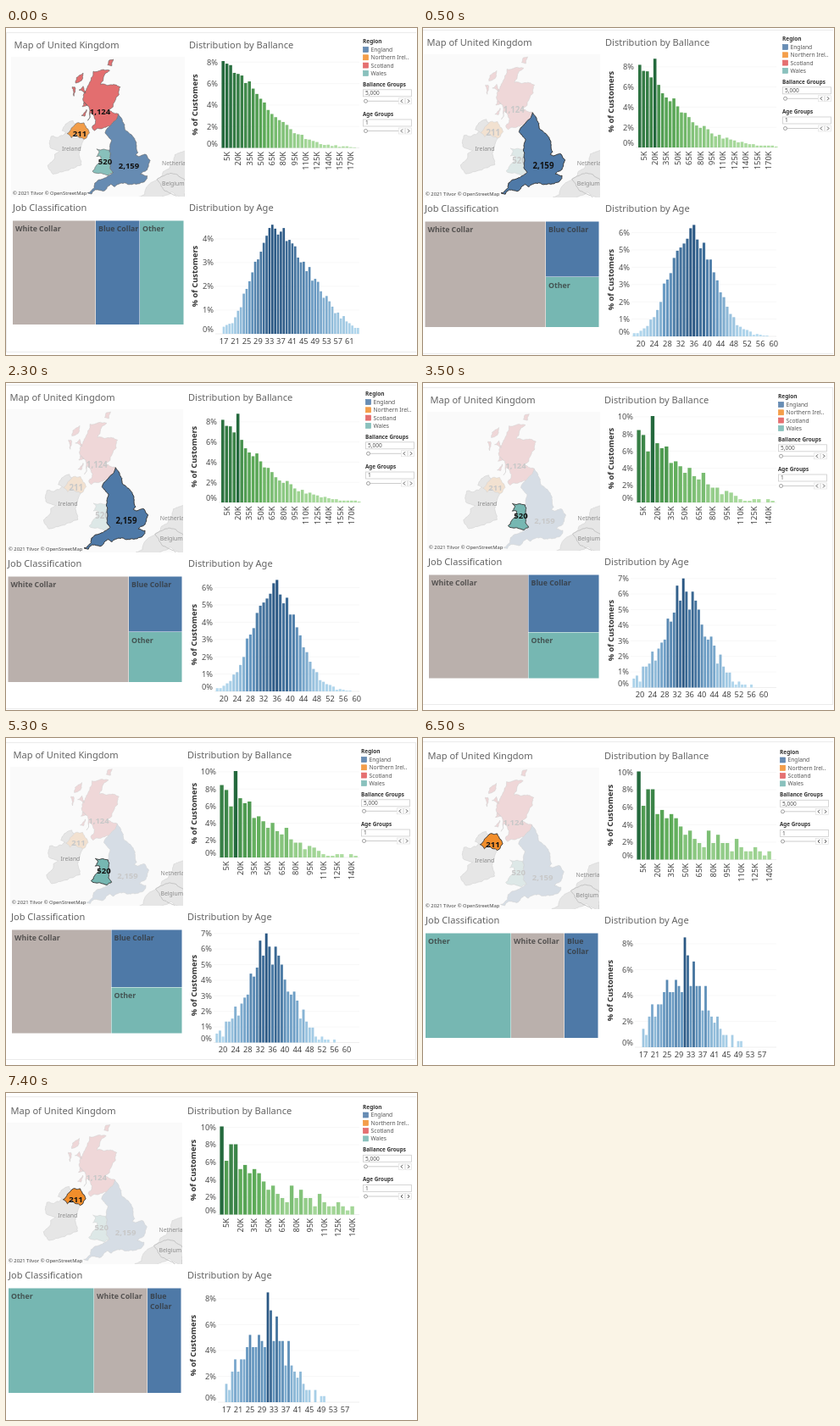
Write an HTML page that moves like this. It is 485 px wide and 386 px high and loops after 8000 ms.

```html
<!DOCTYPE html>
<html lang="en">
<head>
<meta charset="utf-8">
<title>Customer dashboard</title>
<style>
html, body { margin: 0; width: 100%; height: 100%; overflow: hidden; background: #fff; }
svg { display: block; width: 485px; height: 386px; font-family: "Noto Sans", "Open Sans", sans-serif; }
.scene { visibility: hidden; animation: 8s step-end infinite; }
.scene:nth-of-type(1) { animation-name: all; }
.scene:nth-of-type(2) { animation-name: england; }
.scene:nth-of-type(3) { animation-name: wales; }
.scene:nth-of-type(4) { animation-name: northern; }
@keyframes all { 0% { visibility: visible } 6.25%, 100% { visibility: hidden } }
@keyframes england { 0% { visibility: hidden } 6.25% { visibility: visible } 43.75%, 100% { visibility: hidden } }
@keyframes wales { 0% { visibility: hidden } 43.75% { visibility: visible } 81.25%, 100% { visibility: hidden } }
@keyframes northern { 0% { visibility: hidden } 81.25%, 100% { visibility: visible } }
</style>
</head>
<body>
<svg id="stage" viewBox="0 0 485 386"></svg>
<script>
const NS = 'http://www.w3.org/2000/svg';
const stage = document.getElementById('stage');

function el(parent, tag, attrs = {}) {
  const node = document.createElementNS(NS, tag);
  for (const k in attrs) node.setAttribute(k, attrs[k]);
  return parent.appendChild(node);
}
const rect = (g, x, y, width, height, fill, more) => el(g, 'rect', { x, y, width, height, fill, ...more });
const line = (g, d, stroke, width = 1) => el(g, 'path', { d, stroke, fill: 'none', 'stroke-width': width });

// y is the middle of the capitals
function text(g, x, y, str, size, fill, more = {}) {
  const t = el(g, 'text', { x, y: y + size * 0.36, 'font-size': size, fill, ...more });
  t.textContent = str;
}
function upright(g, x, y, str, size, fill, more) {
  text(g, 0, 0, str, size, fill, { transform: `translate(${x} ${y}) rotate(-90)`, ...more });
}

// Repeatable noise from 0 to 1
function hash(n) {
  const v = Math.sin(n) * 43758.5453;
  return v - Math.floor(v);
}

// Map: key points in degrees, Mercator projection, roughened coasts
const merc = lat => Math.log(Math.tan((45 + lat / 2) * Math.PI / 180)) * 180 / Math.PI;
const project = (lon, lat) => [96 + (lon + 5.7) * 9.95, 195.5 - (merc(lat) - merc(50)) * 9.75];

// The noise depends on the midpoint alone, so that shared borders agree
function roughen(a, b) {
  const size = Math.hypot(b[0] - a[0], b[1] - a[1]);
  if (size < 2.5) return [b];
  const x = (a[0] + b[0]) / 2, y = (a[1] + b[1]) / 2, key = x * 12.9898 + y * 78.233;
  const mid = [x + (hash(key) - 0.5) * size * 0.3, y + (hash(key + 1) - 0.5) * size * 0.3];
  return [...roughen(a, mid), ...roughen(mid, b)];
}
function outline(str) {
  return str.split('/').map(part => {
    const pts = part.trim().split(/\s+/).map(p => project(...p.split(',').map(Number)));
    const edge = pts.flatMap((p, i) => roughen(p, pts[(i + 1) % pts.length]));
    return 'M' + edge.map(p => p.map(n => n.toFixed(1)).join()).join('L') + 'Z';
  }).join('');
}

const REGIONS = {
  England: {
    fill: '#4e79a7', label: '2,159', at: [145, 163],
    d: outline(`-2.03,55.81 -1.55,55.3 -1.15,54.65 -.1,54.1 .13,53.6 .3,53.1 .05,52.9 .4,52.8 1.3,52.93
      1.75,52.5 1.55,52.05 .6,51.5 1.4,51.37 1.38,51.15 .25,50.75 -1.1,50.8 -2.45,50.53 -2.95,50.72 -3.6,50.25
      -4.75,50.3 -5.2,49.97 -5.7,50.06 -4.5,51 -3.5,51.22 -2.67,51.6 -3.05,51.95 -3.05,52.7 -3.1,53.25
      -3,53.7 -2.85,54 -3.6,54.5 -3.05,54.98 -2.2,55.5`)
  },
  'Northern Irel..': {
    fill: '#f28e2b', label: '211', at: [87, 124.5],
    d: outline('-7.3,55 -6.9,55.2 -6.1,55.2 -5.45,54.5 -6.1,54.05 -7.1,54.4 -7.6,54.15 -8.1,54.45')
  },
  Scotland: {
    fill: '#e15759', label: '1,124', at: [111, 98.5],
    d: outline(`-2.03,55.81 -2.2,55.5 -3.05,54.98 -4.85,54.65 -5.15,54.9 -4.7,55.4 -5.3,55.9 -5.65,55.35
      -5.5,56.3 -6.2,56.7 -5.8,57.5 -5.3,58 -5,58.6 -3.05,58.65 -4.1,57.75 -3.3,57.7 -1.8,57.6 -2.4,56.7
      -2.65,56.28 -3.3,56.02 / -6.7,57.4 -6.2,57.65 -5.9,57.2 / -7.1,57.85 -7,58.2 -6.2,58.5 -6.4,58
      / -7.5,57.6 -7.2,57.6 -7.3,57 / -6.3,56.3 -6.1,56.6 -5.7,56.4 / -6.4,55.7 -5.8,56.1 -6,55.65
      / -3.3,59 -3.1,59.3 -2.6,59.35 -2.8,58.95`)
  },
  Wales: {
    fill: '#76b7b2', label: '520', at: [117, 157.5],
    d: outline(`-2.67,51.6 -3.2,51.4 -4.2,51.57 -5.1,51.7 -4.7,52.08 -4.1,52.45 -4.1,52.8 -4.6,52.8
      -4.3,53.1 -4.6,53.35 -4,53.3 -3.1,53.25 -3.05,52.7 -3.05,51.95`)
  }
};
const LAND = outline(`-7.4,55.35 -8.3,55.1 -8.7,54.65 -8.2,54.5 -8.6,54.3 -10,54.25 -10.1,53.45 -9,53.2
  -9.8,52.5 -10.4,52.15 -9.8,51.5 -8.5,51.7 -6.4,52.18 -6.1,54.05
  / .2,49.6 1.1,49.93 1.6,50.7 2.9,51.23 4,51.9 4.7,52.95 8,53.5 8,49.4`);
const BELGIUM = outline('2.55,51.07 3.4,51.37 5,51.45 6.2,50.6 5.8,49.6 4.2,50');

function drawMap(g, { box: [x, y, w, h], shift: [dx, dy, k], pick }, id) {
  el(el(g, 'clipPath', { id }), 'rect', { x, y, width: w, height: h });
  const clip = el(g, 'g', { 'clip-path': `url(#${id})` });
  rect(clip, x, y, w, h, '#fafafa');
  const m = el(clip, 'g', { transform: `translate(${dx} ${dy}) scale(${k})`, 'stroke-linejoin': 'round' });
  el(m, 'path', { d: LAND, fill: '#e6e6e6', stroke: '#d2d2d2', 'stroke-width': 0.6 });
  line(m, BELGIUM, '#b5b5b5', 0.7);
  text(m, 66, 143, 'Ireland', 6.8, '#8a8a8a');
  text(m, 184, 160, 'Netherlands', 6.8, '#8a8a8a');
  text(m, 184, 184, 'Belgium', 6.8, '#8a8a8a');

  function region(r, opacity, stroke, width) {
    el(m, 'path', { d: r.d, fill: '#f2f2f2' });
    el(m, 'path', { d: r.d, fill: r.fill, 'fill-opacity': opacity, stroke, 'stroke-width': width });
  }
  const label = (r, fill) =>
    text(m, ...r.at, r.label, 9.5, fill, { 'text-anchor': 'middle', 'font-weight': 600 });
  const all = Object.values(REGIONS);
  all.forEach(r => pick ? region(r, 0.17, '#d0d0d0', 0.5) : region(r, 0.85, '#666', 0.6));
  all.forEach(r => label(r, pick ? '#c8c8c8' : '#111'));
  if (pick) {
    region(REGIONS[pick], 1, '#333', 0.9);
    label(REGIONS[pick], '#111');
  }
  text(g, x + 2, y + h - 4, '© 2021 Tilvor © OpenStreetMap', 5.8, '#444');
}

// Bar charts
const GREENS = [[179, 224, 166], [94, 172, 88], [36, 105, 61]];
const BLUES = [[185, 221, 241], [103, 152, 193], [42, 87, 131]];
function shade(stops, t) {
  const i = t < 0.5 ? 0 : 1, f = t * 2 - i;
  return `rgb(${stops[i].map((c, j) => Math.round(c + (stops[i + 1][j] - c) * f))})`;
}

const decay = (height, width, power) => i => height * Math.exp(-((i / width) ** power));
const hump = (height, mid, left, right) => i =>
  height * Math.exp(-(((i - mid) / (i < mid ? left : right)) ** 2) / 2);

// A share in percent: curve plus sampling noise, in whole customers, below the tallest bar
function share(c, i, people) {
  const [at, tallest] = c.peak;
  if (i === at) return tallest;
  const v = c.curve(i), spread = Math.sqrt(v * 100 / people);
  const noisy = v + (hash(i * 7.31 + people) * 2 - 1) * spread;
  return Math.min(Math.max(0, Math.round(noisy * people / 100) * 100 / people), tallest * 0.97);
}

function drawChart(g, c, stops, people) {
  for (let p = 0; p <= c.top; p += c.step) {
    const y = c.base - p * c.unit;
    line(g, `M${c.right + 2} ${y}H417`, p ? '#f5f5f5' : '#e8e8e8', 0.7);
    text(g, c.right, p ? y : y - 5, p + '%', 9.3, '#505050', { 'text-anchor': 'end' });
  }
  const w = c.pitch * 0.8;
  for (let i = 0; i < c.count; i++) {
    const v = share(c, i, people), h = v * c.unit;
    if (v) rect(g, c.x + i * c.pitch - w / 2, c.base - h, w, h, shade(stops, v / c.peak[1]));
  }
  upright(g, ...c.title, '% of Customers', 9.3, '#333', { 'text-anchor': 'middle', 'font-weight': 600 });
}
function drawBalance(g, c, people) {
  drawChart(g, c, GREENS, people);
  for (let i = 1; i < Math.min(c.count, 35); i += 3)
    upright(g, c.x + i * c.pitch, c.base + 4.5, 5 * i + 'K', 9.3, '#444', { 'text-anchor': 'end' });
}
function drawAge(g, c, people) {
  drawChart(g, c, BLUES, people);
  for (let age = c.tick; age <= c.last; age += 4)
    text(g, c.x + (age - c.first) * c.pitch, c.base + 8.3, age, 9.3, '#444', { 'text-anchor': 'middle' });
}

const JOBS = { White: ['#bab0ac', 'White Collar'], Blue: ['#4e79a7', 'Blue Collar'], Other: ['#76b7b2', 'Other'] };
function drawTree(g, cells) {
  for (const [job, x, y, w, h] of cells) {
    const [fill, name] = JOBS[job];
    rect(g, x, y, w - 0.5, h - 0.5, fill);
    (w < 50 ? name.split(' ') : [name]).forEach((s, i) =>
      text(g, x + 3, y + 9.5 + 12 * i, s, 8.75, '#333', { 'font-weight': 600, 'fill-opacity': 0.75 }));
  }
}

function drawSlider(g, x, y, title, value) {
  text(g, x, y, title, 6.3, '#333', { 'font-weight': 600 });
  rect(g, x + 0.5, y + 6.5, 57, 8, '#fff', { stroke: '#ccc', 'stroke-width': 0.8 });
  text(g, x + 3, y + 10.5, value, 6.5, '#555');
  line(g, `M${x + 3} ${y + 20}H${x + 42}`, '#ccc');
  el(g, 'circle', { cx: x + 3.5, cy: y + 20, r: 2, fill: '#fff', stroke: '#888', 'stroke-width': 0.8 });
  for (const [cx, dir] of [[46, -1], [54, 1]]) {
    rect(g, x + cx - 3.5, y + 16.5, 7, 7, '#fff', { stroke: '#ddd', 'stroke-width': 0.6 });
    line(g, `M${x + cx - dir} ${y + 18}l${2 * dir} 2l${-2 * dir} 2`, '#444', 0.9);
  }
}
function drawLegend(g, x, y) {
  text(g, x, y, 'Region', 6.5, '#333', { 'font-weight': 600 });
  Object.entries(REGIONS).forEach(([name, r], i) => {
    const cy = y + 9.5 + 9.3 * i;
    rect(g, x + 0.5, cy - 3, 6, 6, r.fill, { 'fill-opacity': 0.85, stroke: r.fill, 'stroke-width': 0.6 });
    text(g, x + 9.5, cy, name, 6.7, '#555');
  });
  drawSlider(g, x, y + 50.3, 'Ballance Groups', '5,000');
  drawSlider(g, x, y + 85.5, 'Age Groups', '1');
}

const SCENES = [
  {
    people: 4014, edges: 'M0 5.5H484M0 382.5H484M.5 5.5V382.5',
    titles: [9.5, 20.5, 216, 8, 212.5], legend: [421, 16],
    map: { box: [6, 34, 205, 165], shift: [0, 0, 1] },
    tree: [['White', 8, 227.5, 98, 123], ['Blue', 106, 227.5, 52, 123], ['Other', 158, 227.5, 52, 123]],
    balance: {
      base: 141.5, unit: 12.65, top: 8, step: 2, right: 250, x: 256.2, pitch: 4.43, title: [223, 90.5],
      count: 36, curve: decay(8, 14, 1.7), peak: [0, 8.1]
    },
    age: {
      base: 361, unit: 28, top: 4, step: 1, right: 245, x: 257, pitch: 3.37, title: [223, 293],
      first: 17, tick: 17, last: 61, count: 48, curve: hump(4.4, 17.5, 7.2, 12.5), peak: [17, 4.6]
    }
  },
  {
    people: 2159, edges: 'M0 2.5H484M0 384.5H484',
    titles: [4.5, 17, 215, 2, 213], legend: [424, 13],
    map: { box: [1, 31, 208, 169], shift: [-5.9, -3.7, 1.02], pick: 'England' },
    tree: [['White', 2.5, 228.5, 142.5, 125], ['Blue', 145, 228.5, 63, 65.5], ['Other', 145, 294, 63, 59.5]],
    balance: {
      base: 141, unit: 11.9, top: 8, step: 2, right: 249, x: 255.8, pitch: 4.47, title: [222, 87],
      count: 37, curve: decay(8.3, 12.8, 1.4), peak: [4, 8.8]
    },
    age: {
      base: 364, unit: 20.4, top: 6, step: 1, right: 244, x: 249.2, pitch: 3.92, title: [222, 297],
      first: 18, tick: 20, last: 60, count: 43, curve: hump(6, 17, 6.4, 7), peak: [18, 6.45]
    }
  },
  {
    people: 520, edges: 'M0 5.5H484M0 379.5H484M483.5 5.5V379.5',
    titles: [8.5, 20, 214, 6, 211.5], legend: [419, 16],
    map: { box: [5, 34, 204, 164], shift: [-1.5, -0.5, 1], pick: 'Wales' },
    tree: [['White', 7, 226.5, 117.5, 122.5], ['Blue', 124.5, 226.5, 83.5, 68], ['Other', 124.5, 294.5, 83.5, 54.5]],
    balance: {
      base: 141, unit: 10.1, top: 10, step: 2, right: 248, x: 254.6, pitch: 5.45, title: [222, 89],
      count: 30, curve: decay(7.4, 14, 1.9), peak: [3, 10.1]
    },
    age: {
      base: 359.5, unit: 18.4, top: 7, step: 1, right: 243, x: 248.8, pitch: 3.65, title: [222, 292],
      first: 18, tick: 20, last: 60, count: 46, curve: hump(6.1, 17, 7.2, 6.8), peak: [16, 7]
    }
  },
  {
    people: 211, edges: 'M0 4.5H484',
    titles: [5.5, 21, 214, 3, 215.5], legend: [421, 16.5],
    map: { box: [1, 35, 207, 167], shift: [-5.4, -0.1, 1.01], pick: 'Northern Irel..' },
    tree: [['Other', 3, 230.5, 101, 124], ['White', 104, 230.5, 63, 124], ['Blue', 167, 230.5, 40, 124]],
    balance: {
      base: 143.5, unit: 10.3, top: 10, step: 2, right: 248, x: 254.6, pitch: 5.5, title: [221, 91],
      count: 30, curve: decay(8.6, 12, 1.1), peak: [0, 10.1]
    },
    age: {
      base: 365, unit: 15.25, top: 8, step: 2, right: 248, x: 260, pitch: 3.5, title: [221, 298],
      first: 17, tick: 17, last: 57, count: 45, curve: hump(5.8, 13, 8, 7.5), peak: [14, 8.5]
    }
  }
];

SCENES.forEach((s, i) => {
  const g = el(stage, 'g', { class: 'scene' });
  line(g, s.edges, '#ebebeb');
  const [x, y, x2, jobX, lowY] = s.titles;
  const title = (tx, ty, str) => text(g, tx, ty, str, 11.05, '#636363');
  title(x, y, 'Map of United Kingdom');
  title(x2, y, 'Distribution by Ballance');
  title(jobX, lowY, 'Job Classification');
  title(x2, lowY, 'Distribution by Age');
  drawMap(g, s.map, 'map' + i);
  drawTree(g, s.tree);
  drawBalance(g, s.balance, s.people);
  drawAge(g, s.age, s.people);
  drawLegend(g, ...s.legend);
});
</script>
</body>
</html>
```
